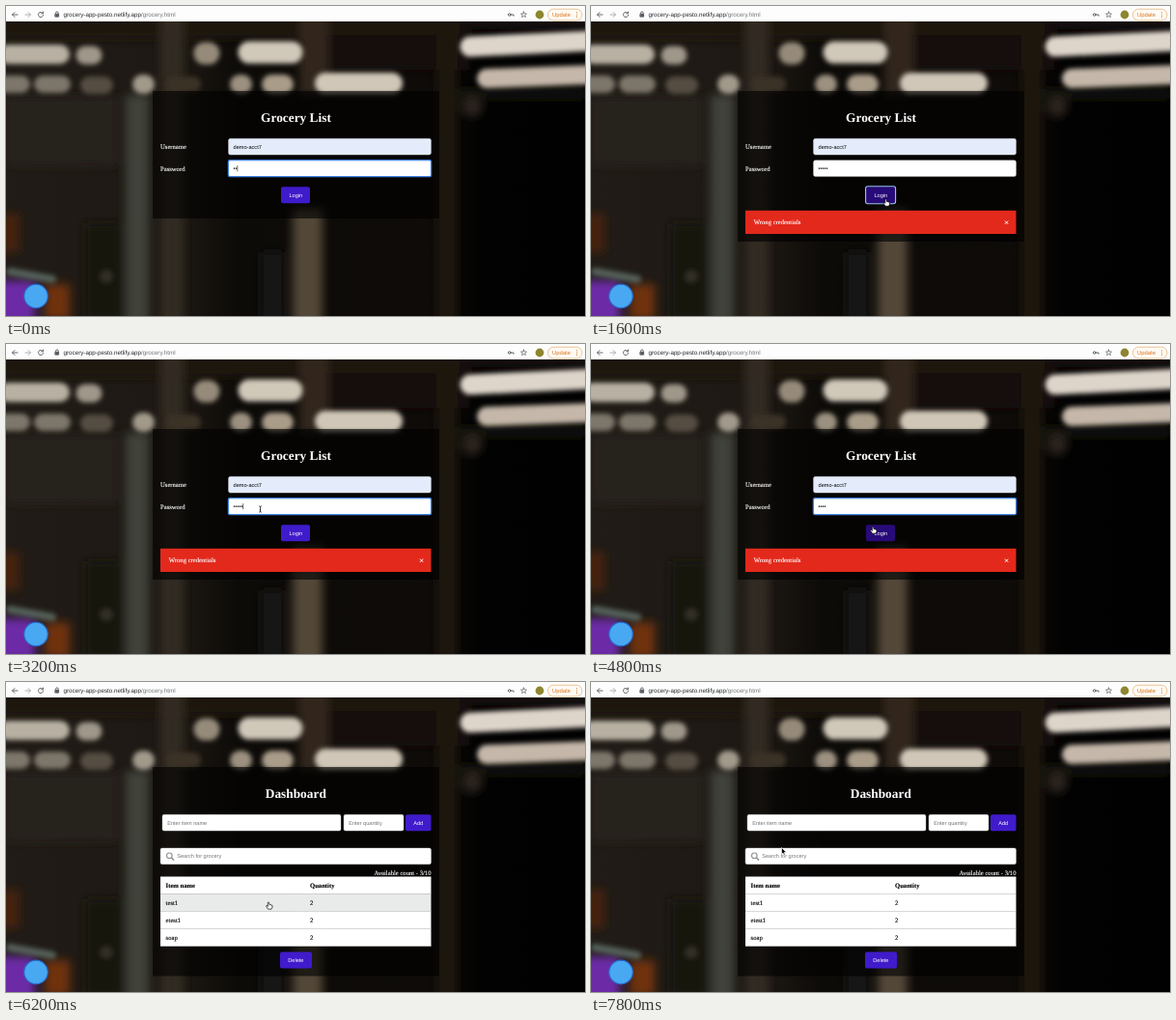
An HTML page for the animation above (8000 ms loop, 600 by 321 pixels).

```html
<!DOCTYPE html>
<html lang="en">
<head>
<meta charset="utf-8">
<title>Grocery List</title>
<style>
  html, body { margin: 0; width: 100%; height: 100%; overflow: hidden; background: #000; }
  svg { display: block; width: 600px; height: 321px; }
  text { font: 5.6px "Liberation Sans", Arial, sans-serif; text-rendering: geometricPrecision; white-space: pre; }
  .serif { font: 6.65px "Liberation Serif", Times, serif; stroke: #000; stroke-width: .12; }
  .serif.light { stroke: #fff; }
  .bold { font-weight: bold; }
  .title { font: bold 13.35px "Liberation Serif", Times, serif; }
  .url { font-size: 6.25px; }
  .mid { text-anchor: middle; }
  .light { fill: #fff; }
  .hint { fill: #70757a; }
  .field { fill: #fff; stroke: #ccc; stroke-width: .4; }
  .button { fill: #401bcb; }
  .button.hover { fill: #280a78; }
  .icon { fill: none; stroke: #555a60; stroke-width: .9; stroke-linecap: round; stroke-linejoin: round; }
  .ring { fill: none; stroke: #4285e6; stroke-width: 1.3; }
</style>
</head>
<body>
<svg viewBox="0 0 600 321">
  <defs>
    <filter id="soft" x="-50%" y="-50%" width="200%" height="200%"><feGaussianBlur stdDeviation="2.6"/></filter>
    <filter id="haze" x="-50%" y="-50%" width="200%" height="200%"><feGaussianBlur stdDeviation="5"/></filter>
    <linearGradient id="wall">
      <stop offset="0" stop-color="#211c17"/><stop offset=".3" stop-color="#1d1813"/>
      <stop offset=".4" stop-color="#0d0b08"/><stop offset=".74" stop-color="#0e0b08"/>
      <stop offset=".82" stop-color="#020202"/><stop offset="1" stop-color="#010101"/>
    </linearGradient>
    <clipPath id="page"><rect y="16" width="600" height="305"/></clipPath>
  </defs>

  <!-- Blurred warehouse backdrop -->
  <g clip-path="url(#page)">
    <rect y="16" width="600" height="305" fill="url(#wall)"/>
    <g filter="url(#haze)">
      <path d="M-10 10H480V34H-10Z" fill="#1d1610"/>
      <path d="M330 30H480V66H330ZM470 10H610V24H470Z" fill="#17110d"/>
      <path d="M0 94H115V165H0Z" fill="#28231c"/>
      <path d="M82 225H120V325H82Z" fill="#16120f"/>
      <path d="M124 92H148V330H124Z" fill="#40423a"/>
      <path d="M160 10H184V330H160Z" fill="#332a22"/>
      <path d="M304 10H334V92H304Z" fill="#33271c"/>
      <path d="M297 210H328V330H297Z" fill="#524638"/>
      <path d="M264 255H288V325H264Z" fill="#191512"/>
      <path d="M446 10H468V330H446Z" fill="#1d1610"/>
      <path d="M470 86H600V96H470Z" fill="#17120e"/>
      <circle cx="483" cy="104" r="11" fill="#2c241d"/>
      <path d="M-8 215H14V255H-8Z" fill="#44200f"/>
      <path d="M40 288H66V325H40Z" fill="#70300f"/>
      <path d="M-10 284H30V330H-10Z" fill="#6c2ca6"/>
    </g>
    <g filter="url(#soft)" stroke-linecap="round" fill="none">
      <path d="M4 275L48 283" stroke="#55605a" stroke-width="8"/>
      <circle cx="104" cy="280" r="7" fill="#302d27"/>
      <path d="M2 50H56" stroke="#b8b1a3" stroke-width="20"/>
      <path d="M82 51H90" stroke="#9f978a" stroke-width="19"/>
      <path d="M206 49H210" stroke="#968b7a" stroke-width="23"/>
      <path d="M252 48H296" stroke="#d0c8b9" stroke-width="23"/>
      <path d="M0 81H16M38 81H58" stroke="#7d766a" stroke-width="18"/>
      <path d="M86 82H102" stroke="#544d42" stroke-width="18"/>
      <path d="M141 81H144" stroke="#a19a8b" stroke-width="20"/>
      <path d="M174 81H194" stroke="#3b3228" stroke-width="16"/>
      <path d="M242 81H245" stroke="#9c9180" stroke-width="20"/>
      <path d="M275 81H288" stroke="#a99c89" stroke-width="20"/>
      <path d="M331 80H400" stroke="#d0c7b8" stroke-width="22"/>
      <path d="M481 42L610 36" stroke="#ded5ca" stroke-width="21"/>
      <path d="M498 75L610 71" stroke="#c5b7a9" stroke-width="20"/>
    </g>
  </g>
  <circle cx="31" cy="300.5" r="12.3" fill="#48a8f2" stroke="#2767c9" stroke-width="1.2"/>

  <!-- Browser toolbar -->
  <rect width="600" height="16" fill="#fdfdfd"/>
  <g class="icon">
    <path d="M12 9H6.5M9 6.5L6.5 9L9 11.5"/>
    <path d="M20 9H25.5M23 6.5L25.5 9L23 11.5" stroke="#a5a8ab"/>
    <path d="M38.2 7.5A2.6 2.6 0 1 0 38.6 9.5M38.5 6V7.8H36.7"/>
    <path d="M51.6 8.3V7.2A1.3 1.3 0 0 1 54.2 7.2V8.3"/>
    <rect x="51.2" y="8.3" width="3.4" height="2.8" fill="#555a60"/>
    <circle cx="521.7" cy="9" r="1.3"/><path d="M523 9H526V10.3"/>
    <path d="M536.5 6L537.3 8L539.5 8.1L537.8 9.5L538.4 11.6L536.5 10.4L534.6 11.6L535.2 9.5L533.5 8.1L535.7 8Z" stroke-width=".7"/>
  </g>
  <text class="url" x="59.5" y="11" fill="#24272b">grocery-app-pesto.netlify.app<tspan fill="#70757a">/grocery.html</tspan></text>
  <circle cx="553" cy="9" r="4.4" fill="#8d8530"/>
  <rect x="561.5" y="3.2" width="35.5" height="11.8" rx="5.9" fill="#fffaf4" stroke="#e9b579" stroke-width=".8"/>
  <text x="566" y="11" style="font-size:5.9px" fill="#d8741c">Update</text>
  <g fill="#d8741c"><circle cx="591.5" cy="6.8" r=".6"/><circle cx="591.5" cy="9" r=".6"/><circle cx="591.5" cy="11.2" r=".6"/></g>

  <rect id="panel" x="152" y="88" width="297" fill="#000" fill-opacity=".62"/>

  <g id="login">
    <text class="title mid light" x="300.5" y="119.5">Grocery List</text>
    <text class="serif light" x="160" y="148">Username</text>
    <text class="serif light" x="160" y="170.5">Password</text>
    <rect class="field" x="230.5" y="137.3" width="210" height="16.8" rx="2" style="fill:#e4ecfb"/>
    <text x="235.6" y="147.7">demo-acct7</text>
    <rect class="field" x="230.5" y="159.8" width="210" height="16.8" rx="2"/>
    <rect id="focus" class="ring" x="230.4" y="159.7" width="210.2" height="17" rx="1.6"/>
    <path id="caret" stroke="#000" stroke-width=".6"/>
    <text id="password" x="235.6" y="170.2"></text>
    <rect id="submit" class="button" x="285" y="187.2" width="30" height="17" rx="2"/>
    <rect id="submitRing" x="284.6" y="186.7" width="31" height="18" rx="2.2" fill="none" stroke="#9dc4fa" stroke-width="1.1"/>
    <text class="mid light" x="300.3" y="197.6">Login</text>
    <g id="error">
      <rect x="160" y="211.8" width="280.5" height="24.2" fill="#e3291c"/>
      <text class="serif light" x="168.8" y="226">Wrong credentials</text>
      <path d="M429 222.6L432.2 225.8M432.2 222.6L429 225.8" stroke="#fff" stroke-width="1"/>
    </g>
  </g>

  <g id="dashboard">
    <text class="title mid light" x="300.3" y="119.5">Dashboard</text>
    <rect class="field" x="162" y="137.3" width="185" height="16.8" rx="1.8"/>
    <text class="hint" x="167.2" y="147.7">Enter item name</text>
    <rect class="field" x="350" y="137.3" width="62" height="16.8" rx="1.8"/>
    <text class="hint" x="355.2" y="147.7">Enter quantity</text>
    <rect class="button" x="414" y="137.2" width="26.5" height="17" rx="1.8"/>
    <text class="mid light" x="427.2" y="147.7">Add</text>
    <rect class="field" x="160" y="172" width="280.5" height="16.7" rx="1.8"/>
    <g fill="none" stroke="#92969a"><circle cx="169.3" cy="179.8" r="2.8" stroke-width="1.2"/><path d="M171.4 182L174 184.6" stroke-width="1.6"/></g>
    <text class="hint" x="177.2" y="182.4">Search for grocery</text>
    <text class="serif light" x="440.5" y="199.6" text-anchor="end">Available count - 3/10</text>
    <g id="table"></g>
    <rect class="button" x="284" y="279.4" width="33" height="17" rx="2"/>
    <text class="mid light" x="300.4" y="289.8">Delete</text>
  </g>

  <g id="mouse">
    <path id="arrow" d="M0 0V6.8L1.5 5.4L2.5 7.7L3.6 7.2L2.6 5H4.8Z" fill="#000" stroke="#fff" stroke-width=".6"/>
    <path id="hand" d="M-.7 .4Q0 -.6 .7 .4L1 2.6L2.4 2.8L4 3.4V5.3L3 7.2H-.4L-2.5 4.2Q-2.4 3.2 -1.4 3.6L-.6 4.4Z" fill="#fff" stroke="#000" stroke-width=".7" stroke-linejoin="round"/>
    <path id="beam" d="M-1.3 -3.2Q0 -3.2 0 -2.3Q0 -3.2 1.3 -3.2M0 -2.3V2.3M-1.3 3.2Q0 3.2 0 2.3Q0 3.2 1.3 3.2M-.7 .9H.7" fill="none" stroke="#111" stroke-width=".75"/>
  </g>
</svg>
<script>
const LOOP = 8000, STEP = 200, BLINK = 500;
const ROW_TOP = 201.5, ROW_HEIGHT = 18;
const SUBMITTED = 1400, REFOCUSED = 2800, LOGGED_IN = 5200, POINTER_SHOWN = 800;
const $ = id => document.getElementById(id);
const show = (id, on) => { $(id).style.display = on ? '' : 'none'; };

// time, x, y of the pointer's hot spot
const path = [
  [800, 335, 240], [1200, 305.5, 200], [1800, 305.5, 200], [2400, 263.5, 171],
  [4000, 263.5, 171], [4600, 292, 189], [5000, 292, 189], [5400, 289.5, 155.5],
  [5800, 289.5, 155.5], [6200, 272, 228], [6800, 249.5, 245], [7000, 252, 224],
  [7200, 256, 168], [7400, 111, 110], [7600, 150, 142], [7800, 197.5, 171.5]
];

// time, number of typed characters
const typing = [[0, 2], [200, 3], [400, 4], [600, 5], [4000, 4]];

const rows = [['Item name', 'Quantity'], ['test1', '2'], ['etest1', '2'], ['soap', '2']];
$('table').innerHTML = rows.map(([name, amount], i) => {
  const y = ROW_TOP + i * ROW_HEIGHT, style = i ? 'serif' : 'serif bold';
  return `<rect id="row${i}" x="160" y="${y}" width="280.5" height="${ROW_HEIGHT}" fill="#fff"/>
    <path d="M160 ${y + ROW_HEIGHT}H440.5" stroke="#d9d9d9" stroke-width=".5"/>
    <text class="${style}" x="165.6" y="${y + 11.2}">${name}</text>
    <text class="${style}" x="315" y="${y + 11.2}">${amount}</text>`;
}).join('');

function pointerAt(t) {
  const next = path.findIndex(p => p[0] >= t);
  if (next <= 0) return path[0].slice(1);
  const [t0, x0, y0] = path[next - 1], [t1, x1, y1] = path[next];
  const u = (t - t0) / (t1 - t0), ease = u * u * (3 - 2 * u);
  return [x0 + (x1 - x0) * ease, y0 + (y1 - y0) * ease];
}

function draw(t) {
  const dashboard = t >= LOGGED_IN, error = t >= SUBMITTED && !dashboard;
  const focused = !dashboard && (t < SUBMITTED || t >= REFOCUSED);
  const [x, y] = pointerAt(t), moved = t >= POINTER_SHOWN;
  const inside = (left, top, right, bottom) => moved && x >= left && x <= right && y >= top && y <= bottom;

  show('login', !dashboard);
  show('dashboard', dashboard);
  show('error', error);
  $('panel').setAttribute('height', dashboard ? 216.5 : error ? 156 : 132);

  // The caret restarts its blink after each edit or focus
  const [edited, count] = typing.filter(k => k[0] <= t).pop();
  const blinkStart = t >= REFOCUSED ? Math.max(edited, REFOCUSED) : edited;
  $('password').textContent = '•'.repeat(count);
  $('caret').setAttribute('d', `M${235.9 + count * 1.96} 165.2V171.2`);
  show('caret', focused && Math.floor((t - blinkStart) / BLINK) % 2 === 0);
  show('focus', focused);
  show('submitRing', error && !focused);

  const onSubmit = !dashboard && inside(285, 187, 315, 204);
  $('submit').classList.toggle('hover', onSubmit);
  const row = dashboard && inside(160, ROW_TOP + ROW_HEIGHT, 440, ROW_TOP + 4 * ROW_HEIGHT)
    ? Math.floor((y - ROW_TOP) / ROW_HEIGHT) : 0;
  for (let i = 1; i < rows.length; i++) $('row' + i).setAttribute('fill', i === row ? '#e9ebea' : '#fff');

  const onText = dashboard
    ? inside(162, 137, 347, 154) || inside(160, 172, 440, 188)
    : inside(230, 137, 440, 154) || inside(230, 160, 440, 177);
  const kind = onText ? 'beam' : onSubmit || row ? 'hand' : 'arrow';
  $('mouse').setAttribute('transform', `translate(${x} ${y})`);
  for (const id of ['arrow', 'hand', 'beam']) show(id, moved && id === kind);
}

function tick(now) {
  draw(Math.floor((now % LOOP) / STEP) * STEP);
  requestAnimationFrame(tick);
}
draw(0);
requestAnimationFrame(tick);
</script>
</body>
</html>
```
